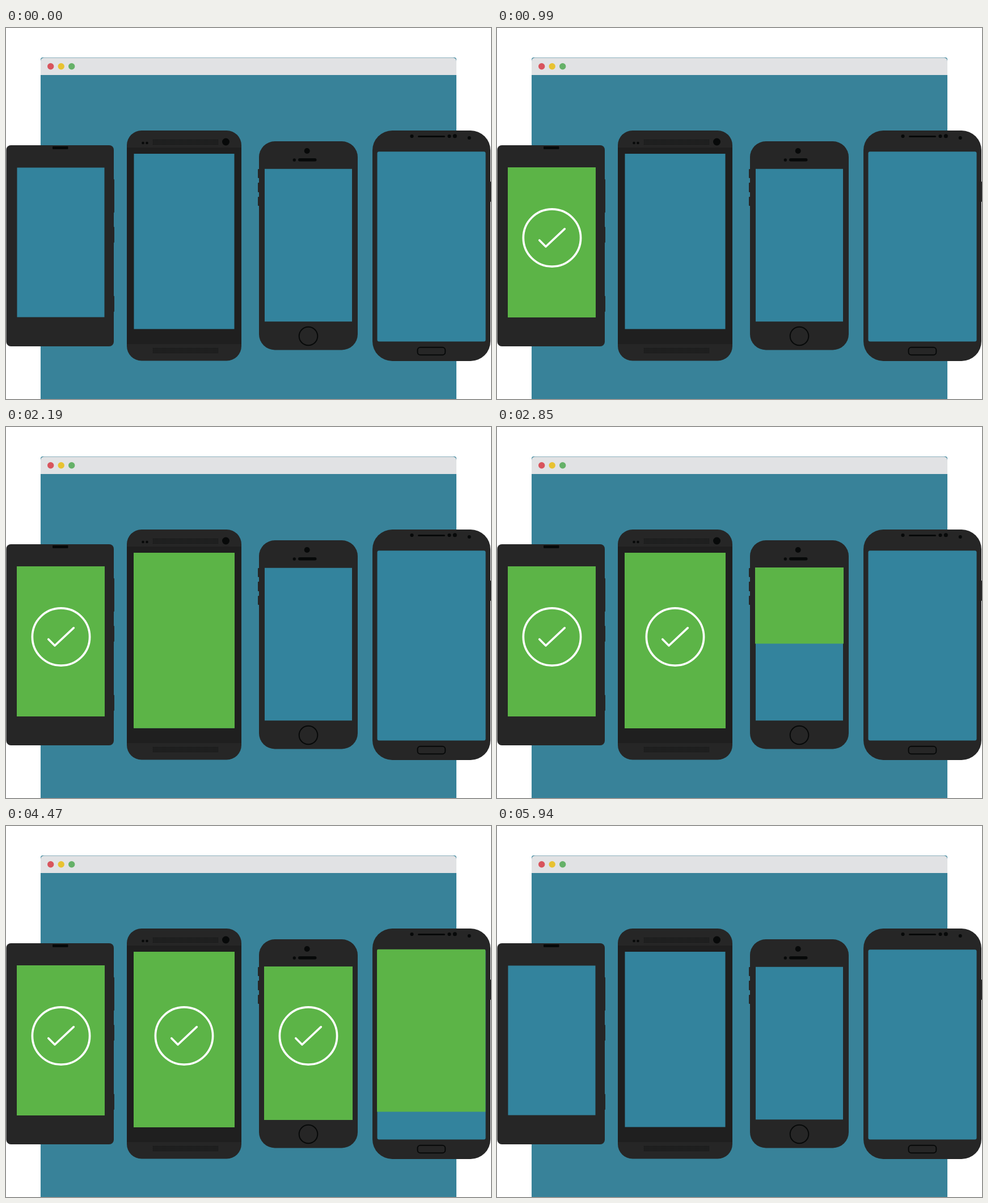
An HTML page with a canvas for the animation above (5.97 s loop, 855 px wide and 655 px high).

```html
<!DOCTYPE html>
<html lang="en">
<head>
<meta charset="utf-8">
<title>Device checks</title>
<style>
html, body { margin: 0; width: 100%; height: 100%; overflow: hidden; background: #fff; }
canvas { display: block; }
</style>
</head>
<body>
<canvas id="stage" width="855" height="655"></canvas>
<script>
const ctx = document.getElementById('stage').getContext('2d');
const LOOP = 5970, STEP = 30;
const TEAL = '#388299', GLASS = '#33839d', BODY = '#262626', INK = '#070909', GREEN = '#5cb447';

// screen box, fill start, fill duration, ease power, check centre
const screens = [
  { x: 19, y: 246, w: 155, h: 265, r: 0, start: 15, dur: 645, pow: 2.5, cx: 97 },
  { x: 225, y: 222, w: 178, h: 310, r: 0, start: 1605, dur: 615, pow: 2.5, cx: 314 },
  { x: 455, y: 248, w: 156, h: 271, r: 0, start: 2685, dur: 735, pow: 2.7, cx: 533 },
  { x: 654, y: 217.5, w: 191.5, h: 336.5, r: 3, start: 3891, dur: 939, pow: 2, cx: 750.5 }
];
const CHECK_FADE = 330, CLEAR_AT = 5760, CLEAR_DUR = 180;

const clamp = v => Math.max(0, Math.min(1, v));

function box(x, y, w, h, r, color) {
  ctx.fillStyle = color;
  ctx.beginPath();
  ctx.roundRect(x, y, w, h, r);
  ctx.fill();
}

function dot(x, y, r) {
  ctx.fillStyle = INK;
  ctx.beginPath();
  ctx.arc(x, y, r, 0, Math.PI * 2);
  ctx.fill();
}

function grille(x, y, w, h) {
  ctx.fillStyle = INK;
  for (let j = 0; j < h; j += 2)
    for (let i = 0; i < w; i += 2) ctx.fillRect(x + i, y + j, 1, 1);
}

function drawWindow() {
  box(61, 52, 733, 610, 4, TEAL);
  box(61, 52.5, 733, 30.5, [6, 6, 0, 0], '#e1e2e4');
  ['#d8545d', '#e8c231', '#65b168'].forEach((c, i) =>
    box(73 + i * 18.5, 62, 11.4, 11.4, 5.7, c));
}

function drawPhones() {
  // squared phone
  box(0.5, 207, 189.5, 355, 8, BODY);
  [[267, 59], [351, 28], [473, 28]].forEach(([y, h]) => box(188, y, 3, h, 1, BODY));
  box(82, 209, 27.5, 5, 1, INK);
  box(19.5, 246.5, 154, 264, 0, GLASS);

  // phone with speaker grilles
  box(213, 181, 202, 406.5, 26, BODY);
  box(213, 211, 202, 347, 0, '#1f1f1f');
  dot(241.5, 203, 2.3);
  dot(248.5, 203, 2.3);
  dot(387.5, 201, 6.5);
  grille(259, 197, 116, 10);
  grille(259, 565, 116, 10);
  box(225.5, 222, 177, 309.5, 0, GLASS);

  // phone with round home button
  box(446, 200, 174, 368.5, 28, BODY);
  [[249, 16], [273, 17], [298, 16]].forEach(([y, h]) => box(444, y, 4, h, 1, BODY));
  dot(530.7, 217, 5);
  dot(508.3, 233, 2.7);
  box(515, 230, 32.5, 5.5, 2.75, INK);
  ctx.strokeStyle = INK;
  ctx.lineWidth = 2;
  ctx.beginPath();
  ctx.arc(533, 544, 16.3, 0, Math.PI * 2);
  ctx.stroke();
  box(456, 248.8, 154, 269.5, 0, GLASS);

  // wide phone
  box(646, 181, 208, 407, 35, BODY);
  box(852, 271, 3, 36, 1, BODY);
  dot(715.5, 191, 3.1);
  dot(781.5, 191, 3.1);
  dot(791.3, 190.7, 3.5);
  dot(816.7, 194, 3);
  box(726, 190, 48, 3, 1.5, INK);
  ctx.beginPath();
  ctx.roundRect(725.5, 563.8, 48.8, 13.5, 5);
  ctx.stroke();
  box(654.5, 218.3, 191, 335.2, 3, GLASS);
}

function drawCheck(cx, alpha) {
  ctx.globalAlpha = alpha;
  ctx.strokeStyle = '#fff';
  ctx.lineWidth = 3.7;
  ctx.lineCap = ctx.lineJoin = 'round';
  ctx.beginPath();
  ctx.arc(cx, 370.5, 50.6, 0, Math.PI * 2);
  ctx.moveTo(cx - 22.2, 374.7);
  ctx.lineTo(cx - 11, 386);
  ctx.lineTo(cx + 22.3, 354.7);
  ctx.stroke();
}

function drawScreen(s, t, alpha) {
  const fill = 1 - Math.pow(1 - clamp((t - s.start) / s.dur), s.pow);
  if (!fill || !alpha) return;
  ctx.save();
  ctx.globalAlpha = alpha;
  ctx.beginPath();
  ctx.rect(s.x, s.y, s.w, s.h * fill);
  ctx.clip();
  box(s.x, s.y, s.w, s.h, s.r, GREEN);
  const shown = clamp((t - s.start - s.dur) / CHECK_FADE);
  if (shown) drawCheck(s.cx, alpha * shown);
  ctx.restore();
}

function frame(now) {
  const t = Math.floor((now % LOOP) / STEP) * STEP;
  const alpha = 1 - clamp((t - CLEAR_AT) / CLEAR_DUR);
  ctx.fillStyle = '#fff';
  ctx.fillRect(0, 0, 855, 655);
  drawWindow();
  drawPhones();
  screens.forEach(s => drawScreen(s, t, alpha));
}

const begin = performance.now();
function tick() {
  frame(performance.now() - begin);
  requestAnimationFrame(tick);
}
tick();
</script>
</body>
</html>
```
